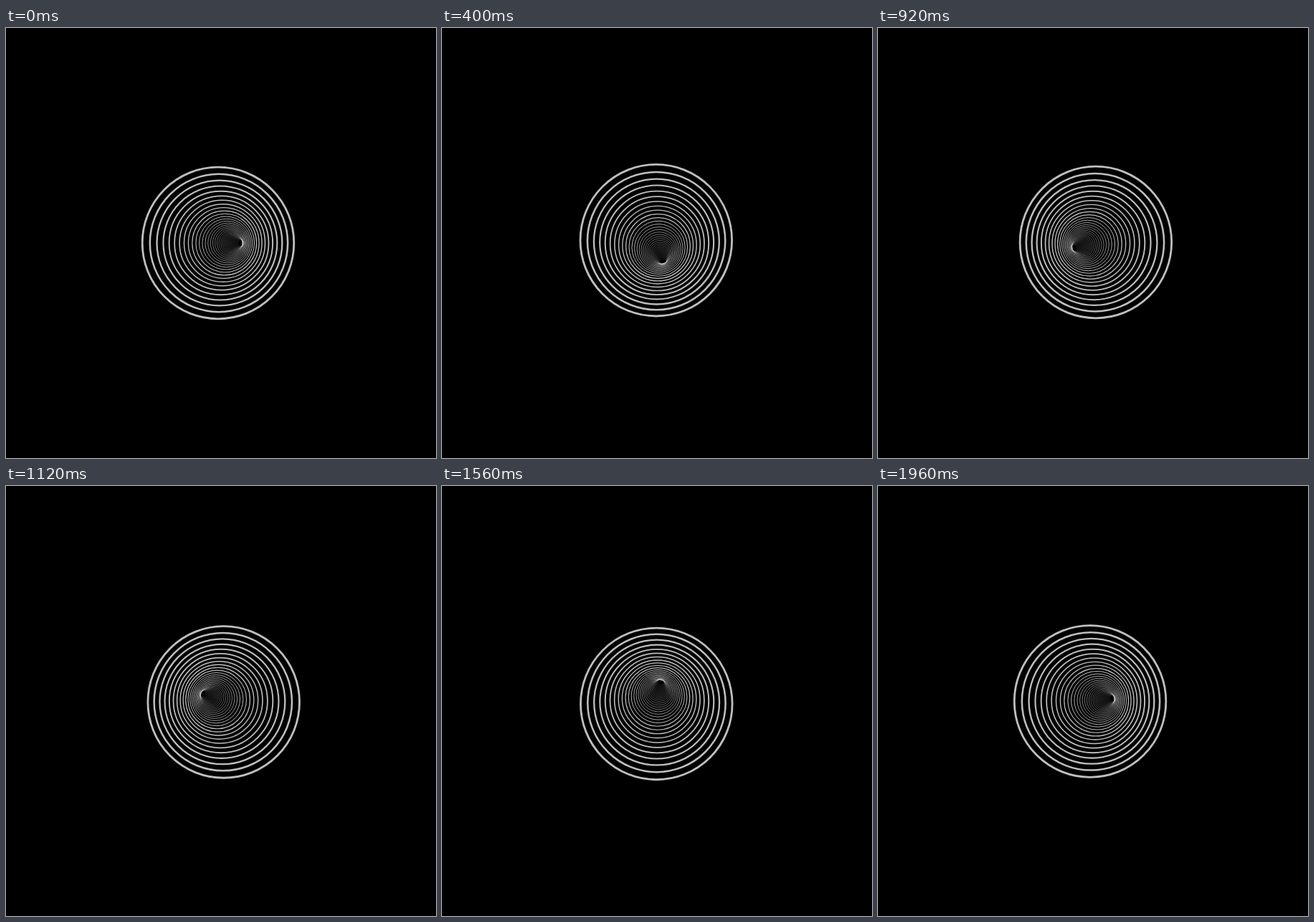
Write an HTML page with a canvas that moves like this. It is 600 px wide and 600 px high and loops after 2000 ms.

```html
<!DOCTYPE html>
<html lang="en">
<head>
<meta charset="utf-8">
<title>Rotating ring cone</title>
<style>
html, body { margin: 0; width: 100%; height: 100%; overflow: hidden; background: #000; }
canvas { display: block; width: 600px; height: 600px; }
</style>
</head>
<body>
<canvas id="stage" width="600" height="600"></canvas>
<script>
const ctx = document.getElementById('stage').getContext('2d');
const LOOP = 2000, STEP = 40;
const RINGS = 34, RADIUS = 105.8, SHRINK = 1 / 1.1, WIDTH = 2.8;
const FIRST_SHIFT = -4, SHIFT_STEP = 0.97;

// Each ring is a scaled copy of the outer one, shifted along the rotating axis.
function draw(time) {
  const angle = 2 * Math.PI * time / LOOP;
  const dx = Math.cos(angle), dy = Math.sin(angle);
  ctx.fillStyle = '#000';
  ctx.fillRect(0, 0, 600, 600);
  ctx.strokeStyle = 'rgba(255, 255, 255, 0.75)';
  for (let i = 0; i < RINGS; i++) {
    const scale = SHRINK ** i;
    const shift = FIRST_SHIFT + SHIFT_STEP * i;
    ctx.lineWidth = WIDTH * scale;
    ctx.beginPath();
    ctx.arc(300 + shift * dx, 300 + shift * dy, RADIUS * scale, 0, 2 * Math.PI);
    ctx.stroke();
  }
}

function tick() {
  const time = performance.now() % LOOP;
  draw(Math.floor(time / STEP) * STEP);
  requestAnimationFrame(tick);
}

draw(0);
requestAnimationFrame(tick);
</script>
</body>
</html>
```
